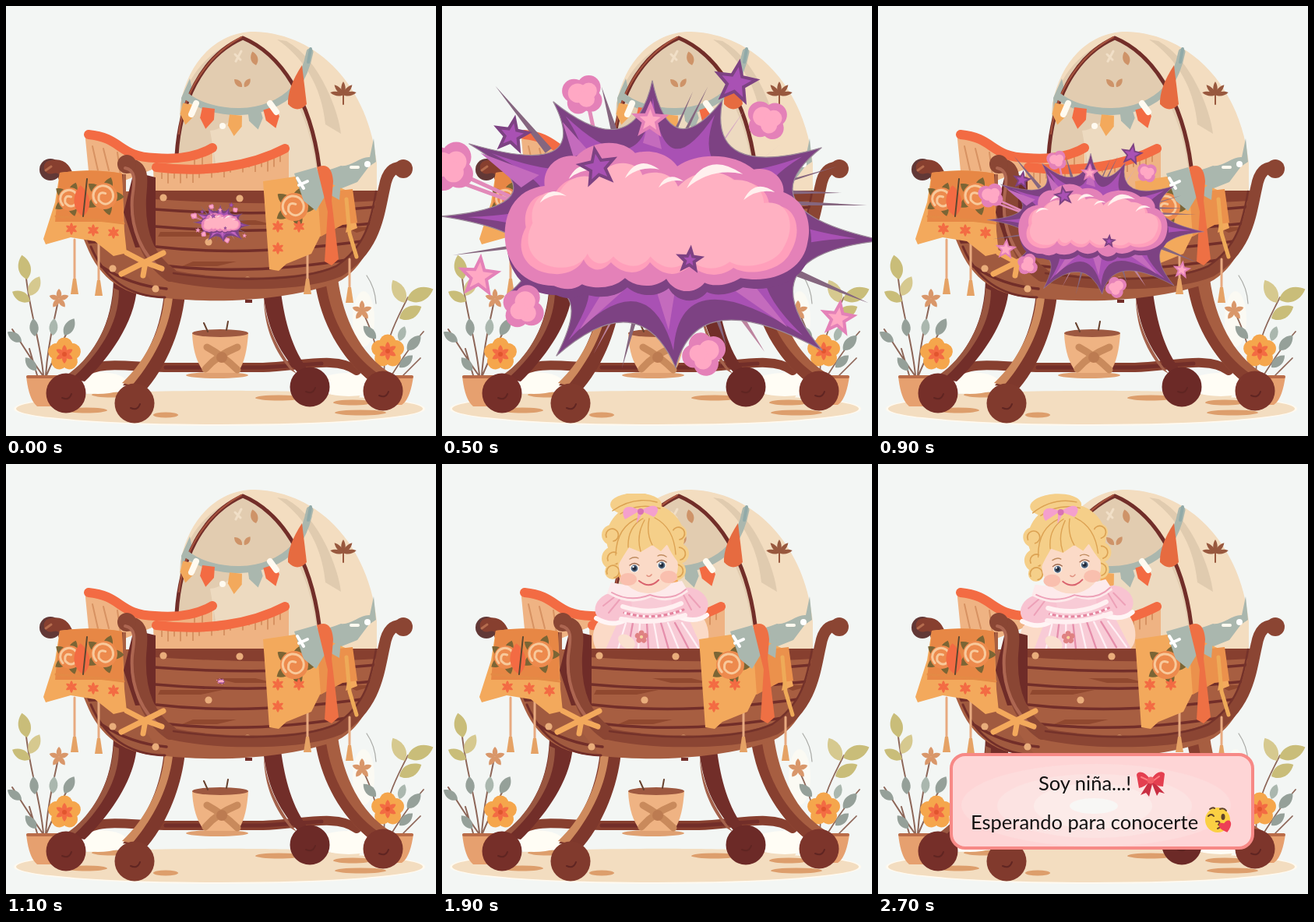
An HTML page for the animation above (2.8 s loop, 552 px wide and 552 px high).

```html
<!DOCTYPE html>
<html lang="es">
<head>
<meta charset="utf-8">
<style>
html,body{margin:0;width:100%;height:100%;overflow:hidden;background:#f3f6f4}
svg{display:block;width:100%;height:100%}
text{font:25.5px Lato,"Open Sans",sans-serif;fill:#111}
</style>
</head>
<body>
<svg id="stage" viewBox="0 0 552 552"></svg>
<script>
const p = (d, fill, extra = '') => `<path d="${d}" fill="${fill}" ${extra}/>`;
const s = (d, color, w = 2) => `<path d="${d}" fill="none" stroke="${color}" stroke-width="${w}" stroke-linecap="round" stroke-linejoin="round"/>`;
const e = (x, y, rx, ry, fill, turn = 0) => `<ellipse cx="${x}" cy="${y}" rx="${rx}" ry="${ry}" fill="${fill}" transform="rotate(${turn} ${x} ${y})"/>`;
const c = (x, y, r, fill) => e(x, y, r, r, fill);
const at = (x, y, k, body, turn = 0) => `<g transform="translate(${x} ${y}) rotate(${turn}) scale(${k})">${body}</g>`;
const ring = (n, f) => Array.from({length: n}, (_, i) => f(i * 360 / n, i)).join('');
const leaf = (x, y, len, turn, fill) => at(x, y, len, p('M0 0C-.34-.25-.32-.7 0-1C.32-.7 .34-.25 0 0', fill), turn);

const dark = '#722e29', brown = '#873f2f', wood = '#a75e41', light = '#ce8a5d',
  cream = '#f3ddc0', orange = '#f36b43', amber = '#f3a95c', peach = '#efb383',
  sage = '#aab7ae', gray = '#95a099', olive = '#c9bd79', petal = '#f5a64c';

const sprig = (x, y) => ring(5, a => leaf(x, y, 13, a, '#d9976a'));
const flower = (x, y) => ring(5, a => at(x, y, 1, c(0, -11, 10.5, petal), a))
  + ring(6, a => leaf(x, y, 12, a, orange)) + c(x, y, 3, '#e2552f');

function plants() {
  const stem = '#8d6658';
  return e(118, 484, 38, 14, '#fffdf5') + e(440, 486, 44, 15, '#fffdf5') + e(459, 402, 14, 36, '#fbfaf3')
    + s('M48 474C44 430 32 400 26 350M47 474C30 450 18 430 8 415M51 474C54 430 62 405 67 378M52 474C66 440 76 425 84 408M40 474L30 440', stem)
    + s('M485 474C486 430 500 405 516 374M482 474C476 430 464 405 457 391M495 474C510 450 525 430 536 418M510 474L532 452', stem, 1.7)
    + s('M463 346Q474 362 475 382', '#a9aaa6', 1.2)
    + leaf(27, 351, 32, -12, olive) + leaf(30, 372, 28, 28, '#d6c98f') + leaf(31, 379, 26, -62, olive)
    + leaf(20, 431, 22, -55, gray) + leaf(37, 424, 23, -5, gray) + leaf(60, 423, 22, 5, sage) + leaf(75, 423, 25, 30, gray) + leaf(39, 468, 22, -40, gray)
    + leaf(515, 377, 36, 68, olive) + leaf(512, 381, 33, -28, '#d6c98f') + leaf(505, 401, 32, 62, olive)
    + leaf(475, 427, 23, -45, gray) + leaf(515, 442, 26, 42, gray) + leaf(505, 430, 20, 20, sage) + leaf(505, 464, 23, 48, gray)
    + sprig(68, 376) + sprig(457, 391) + flower(75, 447) + flower(490, 443)
    + p('M26 475H78V514H40Q29 505 26 475ZM470 475H523Q519 505 508 512H475Z', '#e6a06f')
    + s('M28 476H78M471 476H521', '#b96c49', 4);
}

function ground() {
  return e(274, 517, 264, 22, '#fffaf0') + e(274, 517, 261, 20, cream)
    + p('M80 500C150 491 415 493 455 499L450 508H100Z', cream)
    + [[103, 519, 27], [205, 525, 16], [350, 503, 30], [445, 509, 25], [455, 522, 33], [135, 499, 25]].map(a => e(a[0], a[1], a[2], 3.5, '#dd9e6c')).join('');
}

function legs() {
  const ball = (x, y, fill) => c(x, y, 25.5, fill) + s(`M${x - 5} ${y + 6}q9 4 12-5`, '#602522', 2);
  return s('M98 472C120 455 155 463 203 464H330C380 462 425 449 450 468', brown, 12)
    + s('M205 464H330L405 459', dark, 5)
    + p('M138 350L168 362C165 407 132 452 101 482L78 478C113 446 137 410 138 350Z', dark)
    + p('M138 362C136 410 108 455 76 475L85 478C118 448 145 410 145 365Z', '#995640')
    + p('M330 367L353 368C358 405 367 440 389 469L374 470C348 440 335 412 330 367Z', dark)
    + p('M331 374C334 412 350 443 373 472L365 467C340 437 331 405 331 374Z', '#a4614b')
    + p('M204 345L231 350C231 400 211 456 181 491L150 487C185 449 204 405 204 345Z', '#7e382c')
    + p('M204 358C205 408 180 455 149 484L162 487C194 449 215 404 215 357Z', light)
    + p('M397 354L426 350C433 402 455 447 493 471L470 483C426 451 407 404 397 354Z', wood)
    + p('M397 358C405 405 427 450 470 484L479 473C440 445 418 404 411 358Z', brown)
    + ball(77, 497, '#762f29') + ball(390, 489, '#6c2a27') + ball(165, 510, '#813a2d') + ball(484, 494, '#7d352b');
}

function basket() {
  return e(271, 474, 40, 4, '#dfa071') + p('M239 420H311C309 450 303 463 297 471H255C247 461 240 446 239 420Z', peach)
    + e(275, 420, 36, 5, '#9d5840') + s('M254 407L259 418M283 416L285 405', '#68422f')
    + s('M258 438Q280 450 297 467M297 438Q270 449 256 466', '#c98a5c', 9) + c(277, 451, 7, '#bc7b51');
}

function flag(x, y, fill, turn = 0) {
  return at(x, y, 1, p('M-8 0H8L9 14L0 27L-9 14Z', fill), turn);
}

function canopy() {
  return p('M224 125C235 67 275 32 320 33C402 36 466 105 476 202V237H265V180L224 170Z', cream)
    + p('M224 125Q245 60 304 42C350 58 389 106 402 207L365 237H266V181Q243 198 220 194Z', '#e2ccb0')
    + p('M262 160Q278 160 300 134Q340 134 366 112Q390 150 398 207L365 237H275Z', '#eddac0')
    + p('M360 45C405 70 428 140 430 164L410 152C405 100 380 65 348 43Z', '#e0cbaf')
    + p('M226 145L225 118L236 93L239 107ZM374 220C395 211 410 214 430 205C442 207 455 193 467 194L472 170L475 200L466 206L451 226L426 236H385Z', sage)
    + c(464, 203, 4, '#fff') + s('M443 207h9', '#fffaf0', 4)
    + s('M219 192C223 125 250 65 304 41C352 61 391 119 402 206', dark, 5) + s('M222 164C228 107 261 62 302 40', '#a8543e', 2)
    + s('M232 116C266 142 335 145 370 107Q385 86 390 59', sage, 9) + s('M388 72L391 55', '#91aaa8', 4)
    + flag(235, 126, amber, 10) + flag(260, 131, orange, 8) + flag(295, 140, amber, 5) + c(278, 154, 4, '#fffaf0')
    + flag(318, 132, sage, -12) + flag(338, 131, orange, -18) + s('M339 125L347 136M244 125L238 139', '#fffaf0', 8)
    + p('M380 76L386 126Q374 139 362 126Q361 105 380 76Z', '#e66b40')
    + leaf(321, 76, 18, -15, '#ce9368') + leaf(303, 104, 14, -45, '#ce9368') + leaf(306, 104, 13, 35, '#ce9368')
    + s('M294 62l7 7M302 58l-7 13', '#f1dfc7', 3)
    + [-80, -42, 0, 42, 80].map(a => `<g transform="translate(433 114) rotate(${a}) scale(.65 1)">${leaf(0, 0, 17, 0, '#98583e')}</g>`).join('') + s('M433 114V126', '#98583e');
}

function lining() {
  const folds = ring(20, (a, i) => `<path d="M${200 + i * 8} ${214 - i * 1.2}v${8 + i * 7 % 12}" stroke="#d79262" stroke-width="2"/>`);
  return p('M101 161C140 163 150 193 195 193Q240 196 265 178V207H195L150 225L106 212Z', peach)
    + s('M111 180L118 211M125 183L132 211M143 188L147 217M242 190V203M252 185V203', '#d79262')
    + s('M106 165C149 169 145 194 191 195Q236 199 265 182', orange, 12)
    + p('M189 208C258 214 324 205 363 178V237H190Z', peach) + folds
    + s('M193 207C256 215 316 205 358 183', orange, 12);
}

function hull() {
  const nails = [[202, 246], [300, 247], [260, 303], [310, 352], [192, 363], [137, 337]];
  return p('M64 214L154 216V238H478C480 301 454 344 420 357C363 376 283 383 206 375C151 374 120 350 103 307Z', wood)
    + p('M69 212L150 216V310L106 305Z', dark) + p('M106 305L150 303L200 372C156 376 124 350 106 305Z', '#a05a3f')
    + p('M172 237H478V250Q350 258 190 248Z', brown)
    + p('M198 290H278L250 296H195ZM270 275H320L345 281H294ZM240 328H296L271 334H226ZM435 284H475L450 291Z', '#90482f')
    + s('M191 261Q330 272 474 258M192 283Q325 295 471 279M193 309Q310 323 464 301M201 333Q316 347 449 324M122 334Q160 359 206 363', dark, 3.5)
    + s('M109 309C126 349 155 373 204 374', dark, 3) + p('M307 377h9v4h-9Z', dark)
    + nails.map(n => c(n[0], n[1], 4.6, '#e9ad7b')).join('')
    + c(57, 210, 14, '#623836') + s('M57 207C74 202 77 214 82 229', brown, 17) + s('M51 211l7-5', '#b56c4e', 3)
    + p('M164 213L192 220V309L166 310L151 265Z', '#6f2c28')
    + s('M156 205C178 205 172 228 171 246C169 292 183 326 211 345', '#8a4634', 18) + c(155, 203, 12, '#8a4634')
    + s('M153 208C169 211 164 229 162 246C159 285 175 321 201 339', '#ad6651', 4)
    + s('M210 346C275 360 380 360 428 340C476 309 478 266 486 232Q491 204 510 208', '#8b4533', 15) + c(510, 209, 12, '#8b4533')
    + s('M215 343C290 354 380 354 424 334C465 306 469 270 475 238', '#74322a', 2.5);
}

function rose(x, y, r) {
  return ring(5, a => leaf(x, y, r * 1.5, a + 20, '#7b6535')) + c(x, y, r, '#ed8a4d')
    + s(`M${x - r * .6} ${y + r * .5}a${r * .75} ${r * .75} 0 1 1 ${r * 1.2}-${r * .2}q-${r * .5} ${r * .6}-${r} 0q-${r * .1}-${r * .7} ${r * .5}-${r * .5}`, '#f8c99b', 3);
}
const star6 = (x, y) => ring(6, a => leaf(x, y, 8, a, orange));
const tassel = (x, y, len) => s(`M${x} ${y}v${len - 20}`, '#e8aa80', 3) + p(`M${x - 2} ${y + len - 20}h4l3 20h-10Z`, '#e5a265');

function cloths() {
  return tassel(88, 300, 70) + tassel(119, 302, 70) + tassel(387, 305, 65) + tassel(441, 325, 56)
    + p('M69 214Q110 208 149 215L152 289L155 317L138 321L114 302L83 297L51 306L48 299L63 252Z', amber)
    + p('M69 214Q110 208 149 215L151 277H63L66 245Z', '#e78745')
    + rose(82, 248, 15) + rose(126, 244, 17) + leaf(99, 270, 40, -5, orange) + s('M99 270L104 222', '#5c4930', 2)
    + s('M64 270Q105 273 151 279', '#e48a45', 3) + star6(84, 286) + star6(112, 288) + star6(138, 291)
    + p('M330 225L371 219L408 224L440 238L451 285L436 291L439 275L403 296L392 318L360 331L350 340L338 338Z', amber)
    + p('M400 240L445 235L451 278L432 281L404 296Z', '#eb914c') + s('M437 248L441 292L450 322', '#eeaa58', 5)
    + rose(370, 258, 18) + star6(349, 283) + star6(349, 311) + star6(376, 283)
    + p('M370 215L398 207L413 238L430 225L428 249L412 240L398 263L382 250Z', sage) + s('M374 221l8 13m-6-4l11-5', '#fff', 4)
    + p('M399 207Q418 199 420 225L418 250L427 325L418 333L409 328L413 264Z', '#ee7044')
    + s('M202 317L178 329L148 344M178 329L155 317M178 329L200 337M179 329L176 346', amber, 7);
}

function girl() {
  const hair = '#f5cf89', gold = '#dca253', skin = '#fbdac7', rose = '#eda1b8';
  const eye = (x, y) => e(x, y, 5.5, 5, '#fff') + c(x, y, 4.4, '#4a6078') + c(x, y, 2.4, '#202735') + c(x - 1.5, y - 2, 1.2, '#fff') + s(`M${x - 6} ${y - 4}q6-5 12 0`, '#9b694e', 1.3);
  const folds = ring(9, (a, i) => s(`M${236 + i * 9} 204Q${231 + i * 11} 220 ${226 + i * 13} 238`, i % 2 ? '#e58eab' : '#fff0f4', 2.3));
  return e(211, 220, 17, 24, skin, 8) + e(327, 217, 15, 26, skin, -8)
    + p('M226 159Q265 151 304 159L317 199L344 260H200L228 198Z', '#f8cbd6')
    + e(220, 184, 24, 19, '#f8c3d1', -18) + e(318, 179, 24, 20, '#f8c3d1', 18)
    + s('M207 182L221 171M214 191L228 174M309 166L320 187M317 168L331 184', rose) + s('M198 198Q218 210 236 200M303 196Q326 205 340 194', '#fff5f5', 6)
    + folds + s('M232 183Q270 196 307 179M230 199Q272 207 312 194', '#fff0f1', 6) + s('M234 191Q272 202 310 187', '#e5849f', 3)
    + '<path d="M234 191Q272 202 310 187" fill="none" stroke="#fff" stroke-width="3" stroke-dasharray="3 5"/>'
    + p('M217 152Q260 161 308 150L316 164Q292 182 269 171Q241 184 212 166Z', '#fdeaeb') + s('M218 165Q241 178 267 168Q295 177 313 161', rose)
    + e(237, 228, 12, 8, '#fae0cf', 35) + ring(5, a => at(256, 222, 1, c(0, -5, 3.5, '#df8182'), a)) + c(256, 222, 2, '#f6d49a')
    + e(261, 95, 50, 45, hair) + e(249, 52, 33, 15, hair)
    + [[218, 91, 13], [220, 121, 15], [219, 138, 10], [303, 89, 11], [304, 115, 13], [301, 137, 12]].map(a => c(a[0], a[1], a[2], hair) + s(`M${a[0] - 7} ${a[1] + 3}a8 8 0 1 1 9 5`, gold, 1.7)).join('')
    + e(265, 131, 38, 35, skin)
    + e(239, 148, 11, 8, '#f9bfae') + e(291, 145, 11, 8, '#f9bfae')
    + p('M226 130C220 105 232 77 258 68C295 67 309 96 303 126Q294 115 289 103L281 112L270 104L255 113L240 107Q232 119 226 130Z', hair)
    + s('M253 69Q224 80 223 117M258 70Q238 81 239 107M266 70Q262 89 270 104M273 69Q298 82 300 116M260 72Q249 92 255 112M219 60Q246 41 276 49M229 64Q252 49 280 57', gold, 1.4)
    + eye(247, 134) + eye(282, 130) + s('M241 122q6-4 11-1M277 118q5-3 11 1', '#c08c60', 1.4)
    + s('M263 143q3 3 6-1', '#e0907f', 1.6) + s('M253 150Q266 161 278 149', '#d9626d', 2)
    + p('M254 60C235 48 228 60 235 71ZM255 60C276 46 283 58 272 68ZM252 58L259 60L250 76Z', '#f4a0cd') + c(255, 61, 4, '#d973b3');
}

function burst() {
  const mid = [276, 280], rim = '#7d4283', plum = '#a951b4';
  const tips = [[270, 97], [360, 122], [487, 183], [566, 302], [488, 443], [300, 465], [147, 450], [82, 373], [0, 271], [35, 178], [143, 124]];
  const spikes = (k, pull) => {
    const pts = tips.map(t => t.map((v, j) => mid[j] + (v - mid[j]) * k));
    return pts.reduce((d, a, i) => {
      const b = pts[(i + 1) % pts.length];
      const q = a.map((v, j) => (v + b[j]) / 2 * (1 - pull) + mid[j] * pull);
      return d + `Q${q} ${b}`;
    }, 'M' + pts[0]) + 'Z';
  };
  const star = (x, y, r, fill, line, turn) => {
    const pts = Array.from({length: 10}, (_, i) => {
      const a = i * Math.PI / 5, d = i % 2 ? .43 * r : r;
      return [d * Math.sin(a), -d * Math.cos(a)];
    });
    return at(x, y, 1, `<path d="M${pts.join('L')}Z" fill="${fill}" stroke="${line}" stroke-width="4"/>`, turn);
  };
  const violet = (x, y, r, turn) => star(x, y, r, plum, rim, turn);
  const pink = (x, y, r, turn) => star(x, y, r, '#ffa8c4', '#e481b8', turn);
  const puff = (x, y, k, turn) => at(x, y, k, c(-11, -5, 16, '#e481b8') + c(9, -10, 16, '#e481b8') + c(12, 8, 15, '#e481b8') + c(-5, 11, 15, '#e481b8') + c(-6, -2, 13, '#ffa8c4') + c(9, -5, 11, '#ffa8c4') + c(6, 6, 11, '#ffa8c4'), turn);
  const ray = (x, y, u, v, fill = '#85667f') => p(`M${x} ${y}L${u - 4} ${v + 3}L${u + 4} ${v - 3}Z`, fill);
  const shine = (x, y, r) => p(`M${x - r} ${y + r * .5}Q${x - r * .3} ${y - r * .9} ${x + r} ${y}Q${x - r * .1} ${y - r * .25} ${x - r} ${y + r * .5}Z`, '#fff0ee');
  const body = 'M144 360C104 360 80 330 81 292C82 258 101 235 132 232C129 207 151 190 173 194C194 172 232 172 248 190C272 183 294 194 302 207C329 188 376 190 400 211C425 206 440 226 438 240C465 250 475 277 469 304C464 338 428 358 383 350C365 361 346 361 337 356C322 374 297 368 288 351C272 364 249 362 235 350C218 366 190 363 180 358Q165 369 144 360Z';
  const inner = 'M148 345C108 345 92 314 108 285C102 256 126 234 143 247C152 223 178 216 194 226C216 192 252 204 256 220C279 211 300 222 304 236C323 215 357 208 379 227C401 225 419 237 420 258C452 252 465 286 447 317C435 343 391 348 374 337C355 352 330 346 320 333C299 354 278 343 267 330C254 349 230 345 217 330C202 347 187 338 182 326C177 338 162 345 148 345Z';
  return ray(69, 104, 137, 187) + ray(205, 105, 224, 172) + ray(341, 105, 309, 169) + ray(322, 111, 292, 178) + ray(507, 207, 434, 229)
    + ray(545, 257, 439, 254) + ray(513, 241, 430, 240) + ray(547, 382, 456, 344) + ray(231, 466, 249, 397) + ray(365, 438, 344, 371)
    + ray(414, 445, 365, 371, '#bd849f') + ray(195, 447, 231, 380, '#bd849f') + ray(14, 321, 99, 309) + ray(436, 177, 386, 218, '#c69ab5') + ray(388, 135, 344, 199, '#d6a8c3')
    + s('M190 137L199 179M31 220L91 247M28 229L88 251', '#e28ab9', 5)
    + p(spikes(1, .57), rim, 'stroke="#9b8898" stroke-width="1.2"') + p(spikes(.88, .72), plum)
    + p('M267 340L300 360L291 417ZM205 370L177 416L233 366ZM258 177L270 130L282 185ZM155 150L188 187L169 195ZM50 190L125 218L102 234ZM374 365L443 413L397 355Z', '#c46bbd')
    + p(body, rim, 'transform="translate(3 12)"') + p(body, '#e481b8') + p(inner, '#ff9fbb') + p(inner, '#ffb1c2', 'transform="translate(14 9) scale(.95)"')
    + [[143, 245, 17], [183, 213, 20], [257, 211, 22], [294, 226, 16], [350, 217, 36], [407, 240, 20]].map(a => shine(...a)).join('')
    + violet(377, 100, 26, 10) + violet(90, 167, 21, 10) + violet(200, 208, 23, -10) + violet(318, 327, 14, 5)
    + pink(267, 148, 20, 2) + pink(48, 348, 24, 5) + pink(508, 402, 20, 8)
    + puff(180, 115, .95, 0) + puff(416, 147, .95, 20) + puff(8, 207, 1.2, 0) + puff(105, 386, 1, 90) + puff(337, 446, 1, 130);
}

function card() {
  const bow = '#e43f50';
  return '<rect x="94" y="373" width="387" height="120" rx="18" fill="#fed5d6" stroke="#f78986" stroke-width="4"/>'
    + e(280, 438, 173, 53, '#fddcdc') + e(278, 439, 125, 41, '#fce3e2') + e(276, 439, 76, 29, '#fcebe9') + e(277, 439, 31, 10, '#f8f7f5')
    + '<text x="206" y="419">Soy niña...!</text><text x="119" y="469">Esperando para conocerte</text>'
    + p('M347 409L337 425L344 422L348 427L352 411L358 426L361 421L368 423L354 408Z', '#c92e42')
    + p('M350 406C342 393 333 394 332 399L335 416Q344 414 350 406ZM350 406C358 393 366 394 368 398L366 414Q356 414 350 406Z', bow)
    + s('M338 402L347 406M361 401L354 406', '#ff7d82', 2) + c(350, 406, 4.5, '#f15d65')
    + c(436, 457, 16, '#fbd043') + s('M424 452q4-4 7 0M426 443q4-3 6-1M439 443q5-2 8 2', '#60432b', 2) + e(443, 453, 2.5, 4, '#60432b')
    + s('M434 459q7-1 3 4q6 2-1 5', '#75462d', 2) + at(446, 464, 1, p('M0 9C-13 0-8-8-1-3C6-10 14-1 0 9Z', '#ed4055'), -15);
}

stage.innerHTML = '<defs><clipPath id="rim"><path d="M0 38H552V237H0Z"/></clipPath></defs><rect width="552" height="552" fill="#f3f6f4"/>'
  + ground() + plants() + legs() + basket() + canopy() + lining()
  + `<g clip-path="url(#rim)"><g id="doll">${girl()}</g></g>` + hull() + cloths()
  + `<g id="boom">${burst()}</g><g id="note">${card()}</g>`;

// Linear keys: [ms, value]
const size = [[100, .13], [600, 1.22], [700, .962], [1100, .02]];
const sway = [[1100, 10], [1600, 45], [2100, -30], [2300, 12], [2500, -11]];
const rise = [[1100, 200], [1600, 0]];

function value(keys, t) {
  const i = keys.findIndex(k => k[0] >= t);
  if (i < 0) return keys[keys.length - 1][1];
  if (!i) return keys[0][1];
  const [a, u] = keys[i - 1], [b, v] = keys[i];
  return u + (v - u) * (t - a) / (b - a);
}

const [doll, boom, note] = ['doll', 'boom', 'note'].map(id => document.getElementById(id));
const show = (el, on) => el.setAttribute('visibility', on ? 'visible' : 'hidden');

function draw(now) {
  const t = Math.floor(now % 2800 / 100) * 100, x = value(sway, t);
  show(boom, t <= 1100);
  boom.setAttribute('transform', `translate(276 279) scale(${value(size, t)}) translate(-276 -280)`);
  show(doll, t > 1100);
  doll.setAttribute('transform', `translate(${x} ${value(rise, t)}) rotate(${x * .28} 268 236)`);
  show(note, t === 2700);
}

const start = performance.now();
function tick() {
  draw(performance.now() - start);
  requestAnimationFrame(tick);
}
tick();
</script>
</body>
</html>
```
